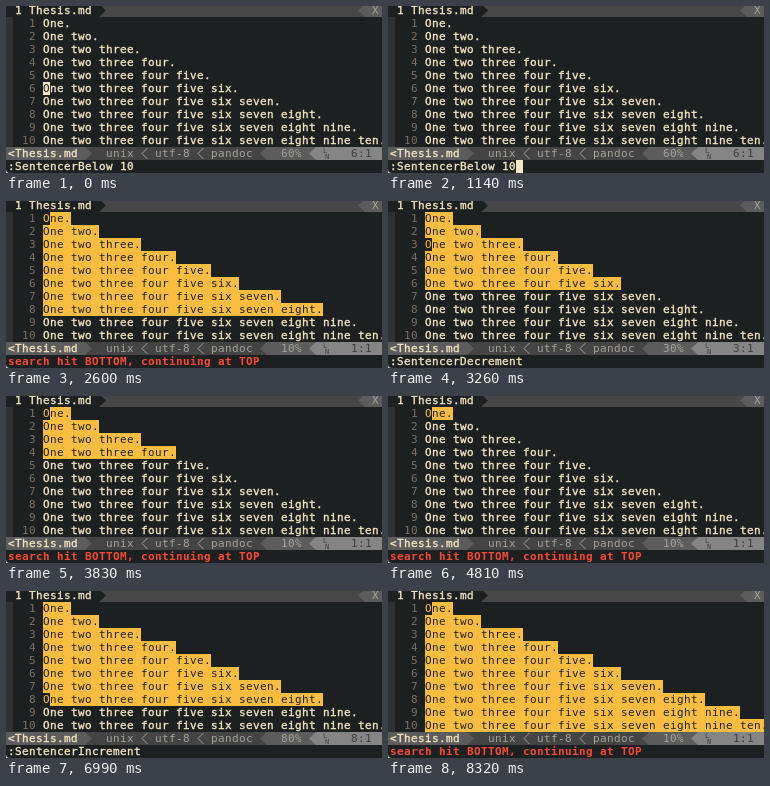
Recreate the animation shown at these times as an HTML page with a canvas. Size 376 by 167 pixels, loop 9130 ms.

```html
<!DOCTYPE html>
<html lang="en">
<head>
<meta charset="utf-8">
<title>Sentence length highlighting</title>
<style>
html, body { margin: 0; width: 100%; height: 100%; overflow: hidden; background: #1d2021; }
canvas { display: block; width: 376px; height: 167px; }
</style>
</head>
<body>
<canvas></canvas>
<script>
const W = 376, H = 167, CELL = 7, LINE = 13, LOOP = 9130;
const BG = '#1d2021', CREAM = '#f3e6c0', YELLOW = '#fabd3f', GREY = '#a6a39b';
const FILL = '#474747', MID = '#444444', PART = '#5c5c5c', END = '#858585', INK = '#3e3e3e';
const FACE = '"DejaVu Sans Mono", monospace';

const canvas = document.querySelector('canvas');
const ctx = canvas.getContext('2d');
const scale = window.devicePixelRatio || 1;
canvas.width = W * scale;
canvas.height = H * scale;

const words = 'One two three four five six seven eight nine ten'.split(' ');
const lines = words.map((_, i) => words.slice(0, i + 1).join(' ') + '.');
const WRAP = 'search hit BOTTOM, continuing at TOP';
const BELOW = ':SentencerBelow 10', DOWN = ':SentencerDecrement', UP = ':SentencerIncrement';

// Each state: start time, highlighted lines, cursor line, bottom text, prompt open
const states = [
  [0, 0, 6, BELOW], [600, 0, 6, ':', true], [1140, 0, 6, BELOW, true], [1650, 10, 7, BELOW]
];
let limit = 10, cursor = 7;
for (const t of [2240, 2600, 2930, 3260, 3560, 3830, 4130, 4450, 4810]) {
  limit--;
  const wraps = cursor >= limit;
  cursor = wraps ? 1 : cursor + 1;
  states.push([t, limit, cursor, wraps ? WRAP : DOWN]);
}
for (const t of [5380, 5680, 5880, 6180, 6420, 6690, 6990, 7220, 7580]) {
  limit++;
  states.push([t, limit, limit, UP]);
}
states.push([8260, 10, 1, WRAP]);

const colX = col => 2 + col * CELL;
const rowY = row => row * LINE - 2;

function box(x, y, w, h, color) {
  ctx.fillStyle = color;
  ctx.fillRect(x, y, w, h);
}

// One glyph per terminal cell; light text gets a slightly heavier stem
function text(str, col, row, color, weight = '') {
  ctx.font = `${weight} 11px ${FACE}`;
  ctx.fillStyle = ctx.strokeStyle = color;
  ctx.lineWidth = 0.35;
  [...str].forEach((char, i) => {
    const x = colX(col + i), y = rowY(row) + 10;
    ctx.fillText(char, x, y);
    if (color === CREAM) ctx.strokeText(char, x, y);
  });
}

// Filled arrow head inside one cell; dir 1 points right, -1 left
function arrow(col, row, dir, color) {
  const x = colX(col) + (dir < 0 ? CELL : 0), y = rowY(row);
  ctx.fillStyle = color;
  ctx.beginPath();
  ctx.moveTo(x, y);
  ctx.lineTo(x + dir * CELL, y + LINE / 2);
  ctx.lineTo(x, y + LINE);
  ctx.fill();
}

function chevron(col, row) {
  const x = colX(col), y = rowY(row);
  ctx.strokeStyle = GREY;
  ctx.lineWidth = 1;
  ctx.beginPath();
  ctx.moveTo(x + 6.5, y + 1);
  ctx.lineTo(x + 1, y + LINE / 2);
  ctx.lineTo(x + 6.5, y + LINE - 1);
  ctx.stroke();
}

function drawTabs() {
  box(0, 0, W, 11, FILL);
  box(0, 0, colX(13), 11, BG);
  arrow(13, 0, 1, BG);
  text('1 Thesis.md', 1, 0, CREAM);
  box(colX(51), 0, W, 11, PART);
  arrow(50, 0, -1, PART);
  text('X', 52, 0, GREY);
}

function drawStatus(line) {
  const y = rowY(11);
  box(0, y, W, LINE, MID);
  box(0, y, colX(11), LINE, PART);
  arrow(11, 11, 1, PART);
  text('<Thesis.md', 0, 11, CREAM);
  text('unix', 14, 11, GREY);
  chevron(19, 11);
  text('utf-8', 21, 11, GREY);
  chevron(27, 11);
  text('pandoc', 29, 11, GREY);
  arrow(36, 11, -1, PART);
  box(colX(37), y, W, LINE, PART);
  text(line + '0%', line > 9 ? 38 : 39, 11, GREY);
  arrow(43, 11, -1, END);
  box(colX(44), y, W, LINE, END);
  ctx.font = '7px ' + FACE;
  ctx.fillStyle = INK;
  ctx.fillText('L', colX(45), y + 6);
  ctx.fillText('N', colX(45) + 2, y + 12);
  text(line + ':1', line > 9 ? 48 : 49, 11, INK);
}

function drawLines(limit, cursor, prompt) {
  box(0, 11, CELL, 130, '#303231');
  lines.forEach((line, i) => {
    const row = i + 1, y = rowY(row), lit = row <= limit;
    text(String(row).padStart(2), 2, row, '#7c6f64');
    if (lit) box(37, y, line.length * CELL, LINE, YELLOW);
    text(line, 5, row, lit ? BG : CREAM);
    if (row === cursor && !prompt) {
      box(37, y, CELL, LINE, lit ? BG : CREAM);
      text('O', 5, row, lit ? YELLOW : BG);
    }
  });
}

// Light backdrop behind the rounded window corner
function drawCorner() {
  ctx.fillStyle = '#d0d0d0';
  ctx.beginPath();
  ctx.moveTo(0, H - 4);
  ctx.quadraticCurveTo(0, H, 4, H);
  ctx.lineTo(0, H);
  ctx.fill();
}

function draw(now) {
  const t = now % LOOP;
  const [, limit, cursor, message, prompt] = states.findLast(s => s[0] <= t);
  ctx.setTransform(scale, 0, 0, scale, 0, 0);
  box(0, 0, W, H, BG);
  drawLines(limit, cursor, prompt);
  drawTabs();
  drawStatus(cursor);
  if (message === WRAP) text(message, 0, 12, '#fb4934', 'bold');
  else text(message, 0, 12, CREAM);
  if (prompt) box(colX(message.length), rowY(12), CELL, LINE, CREAM);
  drawCorner();
}

const start = performance.now();
function tick() {
  draw(performance.now() - start);
  requestAnimationFrame(tick);
}
tick();
</script>
</body>
</html>
```
